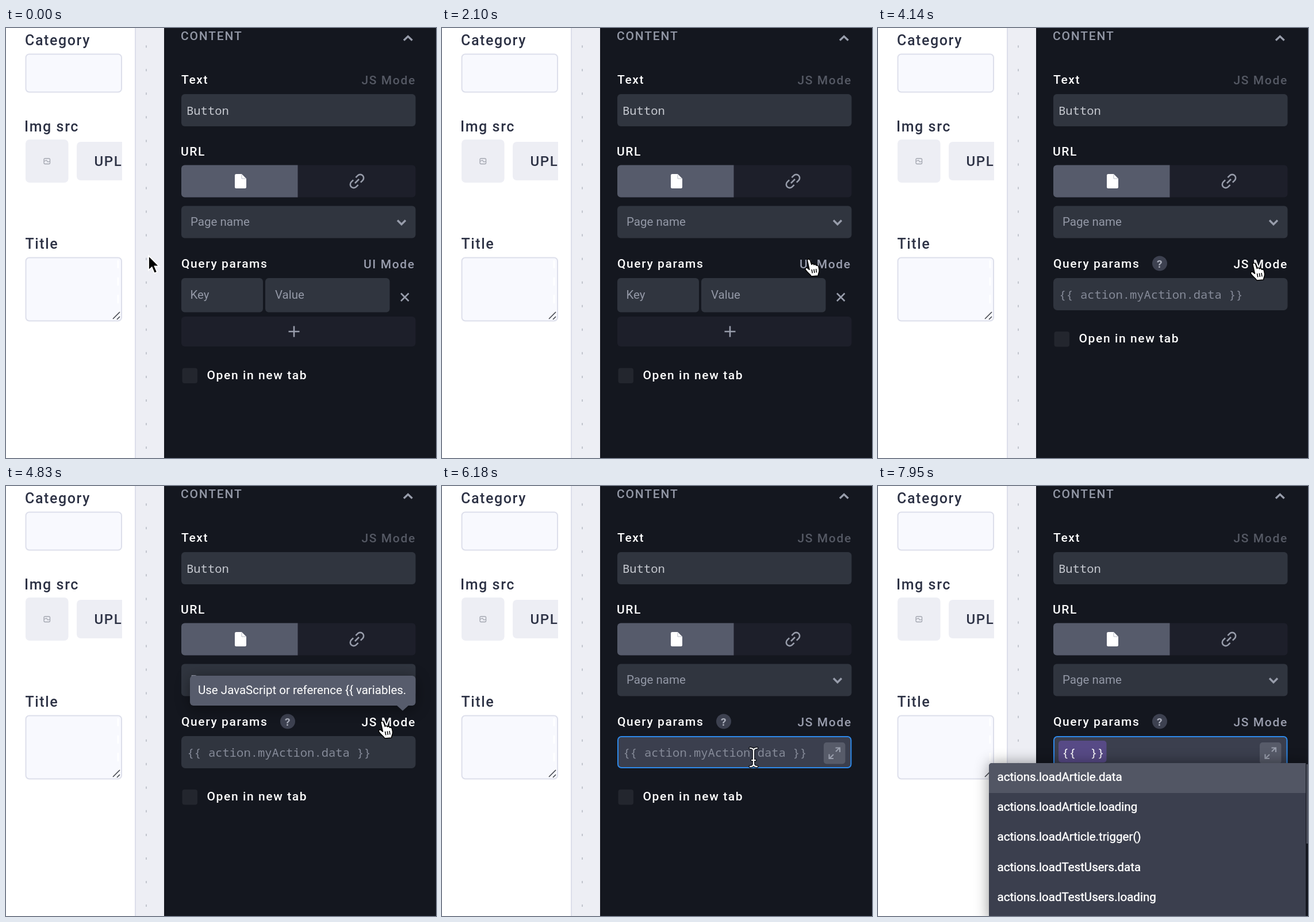
These frames come from a looping animation (748 by 748 pixels, 8 s). An HTML page:

```html
<!DOCTYPE html>
<html lang="en">
<head>
<meta charset="utf-8">
<title>Query params editor</title>
<style>
html, body { margin: 0; height: 100%; overflow: hidden; background: #fff; }
svg { display: block; width: 100vw; height: 100vh; }
text { font: 400 20.5px Roboto, sans-serif; white-space: pre; }
.form { font-weight: 500; font-size: 25px; letter-spacing: 1.6px; fill: #2d3245; }
.label { font-weight: 500; font-size: 21px; letter-spacing: 1.6px; fill: #fff; }
.mono { font-family: "Roboto Mono", "Noto Sans Mono", monospace; fill: #c6c9d0; }
.muted { fill: #9398a6; }
.field { fill: #30353f; }
.light { fill: #f8f9fe; stroke: #dddfeb; stroke-width: 2; }
.line { fill: none; stroke: #989dab; stroke-width: 2.6; }
.bold { stroke-width: 3.4; }
.thin { stroke-width: 2.2; }
.tip rect, .tip path { fill: #575c6c; }
.tip text, #menu text { fill: #fff; }
#menu text { stroke: #fff; stroke-width: .45; }
.tip { filter: drop-shadow(0 4px 12px rgba(0,0,0,.42)); }
#menu { filter: drop-shadow(0 0 12px rgba(0,0,0,.42)); }
</style>
</head>
<body>
<svg viewBox="0 0 748 748">
  <rect width="748" height="748" fill="#fff"/>

  <!-- Form on the canvas -->
  <text class="form" x="33" y="30">Category</text>
  <rect class="light" x="34.5" y="45.5" width="166.5" height="66" rx="6"/>
  <text class="form" x="32" y="179.5">Img src</text>
  <rect x="34" y="194" width="74.5" height="75" rx="7" fill="#edeef4"/>
  <g fill="none" stroke="#a3a6b0" stroke-width="1.3">
    <rect x="66" y="227" width="10.5" height="9.5" rx="2"/>
    <path d="M66 232l4-2 3 3 3-1"/>
  </g>
  <path d="M202 198H130a7 7 0 0 0-7 7v53a7 7 0 0 0 7 7h72z" fill="#edeef4"/>
  <text class="form" x="153.5" y="239.5" style="font-size:24px">UPL</text>
  <rect x="202" y="190" width="22" height="80" fill="#fff"/>
  <text class="form" x="33.5" y="383.5">Title</text>
  <rect class="light" x="34.5" y="399.5" width="166.5" height="110" rx="6"/>
  <path d="M195 404v14M195 434v14M195 464v15" stroke="#fff" stroke-width="3"/>
  <path d="M186 506l12-12M193 507l5-5" stroke="#44474f" stroke-width="1.6"/>
  <rect x="224" width="51" height="748" fill="#edeef4"/>
  <path d="M225 0v748" stroke="#dcdeea" stroke-width="2"/>
  <path d="M244 30.2V748" stroke="#c2c5ce" stroke-width="2" stroke-dasharray="4 37.05"/>

  <!-- Property panel -->
  <rect x="275" width="473" height="748" fill="#14171f"/>
  <text class="label muted" x="304" y="20.5" style="letter-spacing:1.8px">CONTENT</text>
  <path class="line bold" d="M692 21.5l7.3-7 7.3 7"/>
  <text class="label" x="305" y="97">Text</text>
  <text class="label" x="618.5" y="98" style="fill:#555964">JS Mode</text>
  <rect class="field" x="305" y="115" width="407.5" height="56" rx="6"/>
  <text class="mono" x="314" y="150.5">Button</text>
  <text class="label" x="304" y="221.5">URL</text>
  <rect x="305" y="238.5" width="407.5" height="56" rx="6" fill="#1d1f2a"/>
  <path d="M507.5 238.5H311a6 6 0 0 0-6 6v44a6 6 0 0 0 6 6h196.5z" fill="#565b6b"/>
  <path d="M400.5 254h9.5l8 8v14.5a2.5 2.5 0 0 1-2.5 2.5h-15a2.5 2.5 0 0 1-2.5-2.5v-20a2.5 2.5 0 0 1 2.5-2.5z" fill="#fff"/>
  <path d="M410 254.5v7.5h7.5" fill="none" stroke="#b9bcc7"/>
  <path class="line" transform="translate(610.5 266.5) rotate(-45)" d="M-3-6H-8a6 6 0 0 0 0 12H-3M3-6H8a6 6 0 0 1 0 12H3M-5 0H5"/>
  <rect class="field" x="305" y="309.5" width="407.5" height="56" rx="6"/>
  <text class="muted" x="321" y="343.5">Page name</text>
  <path class="line bold" d="M681 334.5l7 7 7-7"/>
  <text class="label" x="305" y="417">Query params</text>
  <text class="label" id="mode" y="417.5"></text>

  <g id="pairs">
    <rect class="field" x="305" y="435" width="142" height="59.5" rx="6"/>
    <rect class="field" x="451" y="435" width="216.5" height="59.5" rx="6"/>
    <text class="muted" x="320.5" y="470.5">Key</text>
    <text class="muted" x="468" y="470.5">Value</text>
    <path class="line" d="M687 461.5l13.5 13.5M700.5 461.5L687 475"/>
    <rect x="305" y="502" width="407.5" height="52" rx="6" fill="#1d1f2a"/>
    <path class="line" d="M491.5 528h19M501 518.5v19"/>
  </g>

  <g id="script">
    <circle cx="490" cy="409.5" r="13" fill="#3d4150"/>
    <text x="485" y="416.5" style="font-weight:700;font-size:19px;fill:#a9adba">?</text>
    <rect id="input" x="306" y="436" width="405.5" height="54" rx="6" stroke-width="2"/>
    <rect id="badge" x="314" y="443" width="83.5" height="38" rx="5" fill="#574a86"/>
    <text class="mono" id="code" y="470.5"></text>
    <g id="expand">
      <rect x="664" y="446" width="37.5" height="37.5" rx="5" fill="#575b69"/>
      <path class="line thin" d="M685 462l6.5-6.5M684.5 455.5h7.5v7.5M681 467l-7 7M673.5 466.5v7.5h7.5"/>
    </g>
    <rect id="caret" y="444" width="2.2" height="37" fill="#f3bb58"/>
  </g>

  <g id="tab">
    <rect x="306.5" y="591.5" width="26.5" height="26.5" rx="4" fill="#23262e"/>
    <text class="label" x="349.5" y="610.5">Open in new tab</text>
  </g>

  <g class="tip" id="tipUi">
    <rect x="289" y="330" width="423.5" height="52" rx="6"/><path d="M679 381h22l-11 10z"/>
    <text x="303" y="362">Enable JavaScript mode to use {{ variables.</text>
  </g>
  <g class="tip" id="tipJs">
    <rect x="320" y="330" width="392.5" height="52" rx="6"/><path d="M679 381h22l-11 10z"/>
    <text x="334" y="362">Use JavaScript or reference {{ variables.</text>
  </g>

  <g id="menu">
    <path d="M744 482H198a5 5 0 0 0-5 5v270h551z" fill="#3b3f4e"/>
    <path d="M744 482H198a5 5 0 0 0-5 5v47h551z" fill="#525664"/>
    <path d="M744 482h4v266h-4z" fill="#14171f"/>
    <path d="M745 484h3v138h-3z" fill="#4b4f5c"/>
  </g>

  <!-- Pointers, drawn around their hot spot -->
  <g id="pointer">
    <path id="arrow" d="M1 0V25.5L6.7 20.2L11 30.5L15.8 28.5L11.5 18.5H19.5Z" fill="#000" stroke="#fff" stroke-width="1.8"/>
    <g id="hand" transform="translate(-4 -1)" stroke="#000" stroke-width="1.5" stroke-linejoin="round">
      <path d="M5 4C4 .5 8.7-.3 9.8 3L12.3 10.5C13.3 8.6 16 9 16.5 11C17.8 9.6 20 10.2 20.5 12.2C22 11.4 24 12.3 24.4 14.2L25.5 19C26.2 23 24 25.5 23.5 30L12 31C10 27 5 24.5 2 20C0 17 3 14.8 5.5 17L8.5 19.3Z" fill="#fff"/>
      <path d="M12.5 19l1.3 6.5M16.3 18.5l1.2 6.5M20 18l1 6.5" fill="none"/>
    </g>
    <g id="beam" fill="none" stroke-linecap="round">
      <defs><path id="stem" d="M-6-16Q0-16 0-11Q0-16 6-16M0-11V11M-6 16Q0 16 0 11Q0 16 6 16M-3 5H3"/></defs>
      <use href="#stem" stroke="#15171d" stroke-width="5"/>
      <use href="#stem" stroke="#fff" stroke-width="2.2"/>
    </g>
  </g>
</svg>
<script>
const LOOP = 8000;
const $ = id => document.getElementById(id);
const set = (id, attrs) => Object.entries(attrs).forEach(([k, v]) => $(id).setAttribute(k, v));
const show = (id, on) => set(id, { opacity: +on });
const write = (id, s) => { if ($(id).textContent !== s) $(id).textContent = s; };
const ramp = (t, a, b) => Math.min(1, Math.max(0, (t - a) / (b - a)));
const ease = (t, a, b) => {
  const p = ramp(t, a, b);
  return p < .5 ? 4 * p ** 3 : 1 - 4 * (1 - p) ** 3;
};

['Article.data', 'Article.loading', 'Article.trigger()', 'TestUsers.data', 'TestUsers.loading'].forEach((name, i) => {
  const row = document.createElementNS('http://www.w3.org/2000/svg', 'text');
  row.setAttribute('x', 207.5);
  row.setAttribute('y', 512.5 + i * 52.4);
  row.textContent = 'actions.load' + name;
  $('menu').append(row);
});

function draw(t) {
  const leave = ease(t, 5670, 6150);
  const x = 247 + 404 * ease(t, 1200, 2350) - 109 * leave;
  const y = 396 + 6 * ease(t, 1200, 2000) + 7 * ease(t, 2100, 2600) + 63 * leave;
  const js = t >= 3870, typing = t >= 7170, closed = t >= 7350;
  const onLabel = x > 618 && y < 424, onInput = js && y > 435;

  // Pointer
  set('pointer', { transform: `translate(${x} ${y})`, opacity: +!typing });
  show('hand', onLabel);
  show('beam', onInput);
  show('arrow', !onLabel && !onInput);

  // Mode switch and its tooltips
  const lit = onLabel ? ramp(t, 2100, 2250) : 0;
  const mix = c => Math.round(c + (255 - c) * lit);
  write('mode', js ? 'JS Mode' : 'UI Mode');
  set('mode', { x: js ? 618.5 : 622, style: `fill:rgb(${mix(153)},${mix(157)},${mix(173)})` });
  show('pairs', !js);
  show('script', js);
  set('tab', { transform: `translate(0 ${js ? -63.5 : 0})` });
  show('tipUi', ramp(t, 2250, 2500) - ramp(t, 3870, 4020));
  show('tipJs', ramp(t, 4300, 4540) - ramp(t, 5900, 6050));

  // Code input
  const fill = onInput ? '#3b3f4e' : '#30353f';
  set('input', { fill, stroke: t >= 6150 ? '#2e89ea' : fill });
  show('expand', onInput);
  show('badge', closed);
  write('code', closed ? '{{  }}' : typing ? '{' : '{{ action.myAction.data }}');
  set('code', { x: closed ? 320 : 315, style: `fill:${closed ? '#fff' : typing ? '#d5d7de' : '#858a98'}` });
  set('caret', { x: closed ? 355 : typing ? 326 : 315 });
  show('caret', (t >= 6480 && t < 6960) || (typing && t < 7950));
  show('menu', ramp(t, 7380, 7560));
}

const start = performance.now();
(function tick() {
  draw((performance.now() - start) % LOOP);
  requestAnimationFrame(tick);
})();
</script>
</body>
</html>
```
